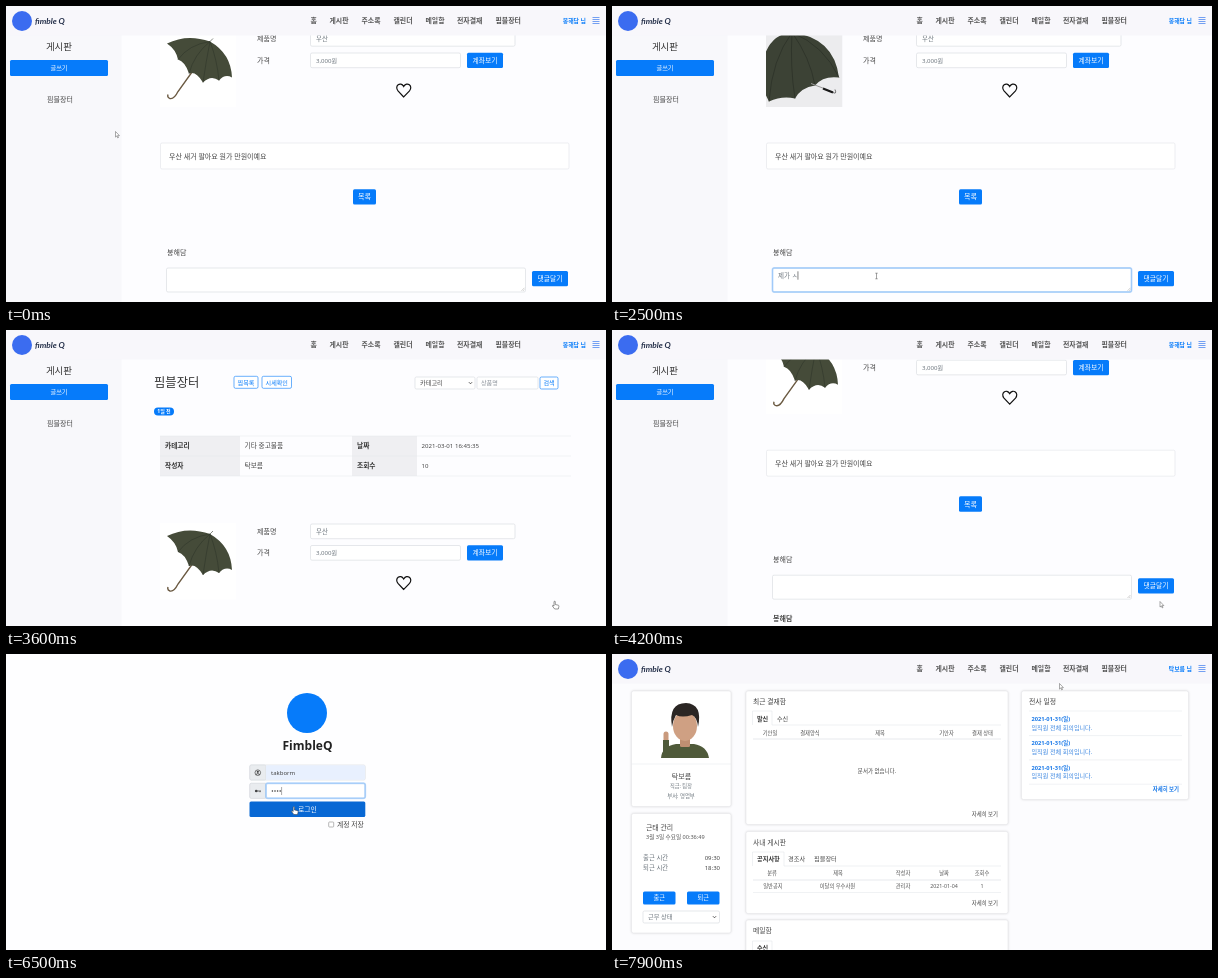
An HTML page that plays this animation: 600 px wide and 296 px high, repeating every 8000 ms.

```html
<!DOCTYPE html>
<html lang="ko">
<head>
<meta charset="utf-8">
<style>
  html, body { margin: 0; width: 100%; height: 100%; overflow: hidden; background: #fdfdff; }
  svg { display: block; width: 100vw; height: 100vh; }
  text { font-family: "Noto Sans", "Noto Sans CJK KR", "Noto Sans CJK", sans-serif; white-space: pre; }
  .brand { font-family: Lato, sans-serif; font-style: italic; font-weight: 700; }
  .card { filter: drop-shadow(0 .6px .8px #0002); }
</style>
</head>
<body>
<svg id="stage" viewBox="0 0 600 296"></svg>
<script>
const LOOP = 8000, BLUE = '#067bfa', INK = '#444', GRAY = '#6c757d', LINE = '#d5d9de';
const BUYER = '봉해담', SELLER = '탁보름', MARKET = '핌블장터', REPLY = '제가 살게요';
const RELOAD = 3300, LOGIN = 5000, HOME = 7500;
const PHOTO = 76.5, SCROLLED = 168.5, SCROLL_END = 264;

// Text is placed by its left edge (or anchor) and vertical centre.
const text = (x, y, s, size = 7, fill = INK, attrs = '') =>
  `<text x="${x}" y="${y + size * .37}" font-size="${size}" fill="${fill}" ${attrs}>${s}</text>`;
const mid = (x, y, s, size, fill, attrs = '') => text(x, y, s, size, fill, 'text-anchor="middle" ' + attrs);
const end = (x, y, s, size, fill, attrs = '') => text(x, y, s, size, fill, 'text-anchor="end" ' + attrs);
const bold = 'font-weight="700"', medium = 'font-weight="500"';
const rect = (x, y, w, h, fill = '#fff', stroke = 'none', r = 1.5, attrs = '') =>
  `<rect x="${x}" y="${y}" width="${w}" height="${h}" rx="${r}" fill="${fill}" stroke="${stroke}" stroke-width=".6" ${attrs}/>`;
const path = (d, stroke = INK, width = .6, fill = 'none', attrs = '') =>
  `<path d="${d}" stroke="${stroke}" stroke-width="${width}" fill="${fill}" ${attrs}/>`;
const circle = (x, y, r, fill, attrs = '') => `<circle cx="${x}" cy="${y}" r="${r}" fill="${fill}" ${attrs}/>`;
const rule = (x1, x2, y, color = '#e1e4e8') => path(`M${x1} ${y}H${x2}`, color, .5);
const group = (id, body, attrs = '') => `<g id="${id}" ${attrs}>${body}</g>`;
const button = (x, y, w, h, s, size = 6.8, id = '') =>
  rect(x, y, w, h, BLUE, 'none', 1.5, id && `id="${id}"`) + mid(x + w / 2, y + h / 2, s, size, '#fff');
const outlineButton = (x, y, w, h, s) => rect(x, y, w, h, '#fff', BLUE) + mid(x + w / 2, y + h / 2, s, 6.1, BLUE);
const chevron = (x, y) => path(`M${x - 1.6} ${y - .8}l1.6 1.6 1.6 -1.6`, '#333', .8);
const focusRing = (id, x, y, w, h) => group(id,
  rect(x, y, w, h, 'none', BLUE, 2, 'style="stroke-width:2;stroke-opacity:.22"') +
  rect(x, y, w, h, 'none', '#94c6ff'));

function header() {
  const nav = [[304.5, '홈'], [323.5, '게시판'], [355.5, '주소록'], [387.5, '캘린더'],
    [419.5, '메일함'], [451, '전자결재'], [489.5, MARKET]];
  return rect(0, 0, 600, 29.5, '#f8f7fb', 'none', 0) +
    circle(16, 15, 10, '#3b6cf0') +
    text(29, 15, 'fimble Q', 8.3, '#25304a', 'class="brand"') +
    nav.map(([x, s]) => text(x, 14.3, s, 6.9, '#555', bold)).join('') +
    end(580, 14.5, '', 5.9, BLUE, bold + ' id="user"') +
    path('M586.5 11.5h7m-7 2h7m-7 2h7m-7 2h7', '#3b7cf0', .7);
}

function sidebar() {
  return rect(0, 29, 115.5, 267, '#f8f8fb', 'none', 0) +
    mid(53, 40, '게시판', 9.5, '#333') +
    button(4, 54, 98, 16, '글쓰기', 6.2) +
    mid(54, 93, MARKET, 7, INK);
}

function openUmbrella(x) {
  return `<g transform="translate(${x})">` + rect(154, 193, PHOTO, PHOTO, '#fff', 'none', 0) +
    path('M195 222L172 254Q168 262 164 261Q161 260 162 257', '#6b5a42', 1.4) +
    path('M161 206Q181 196 204 204Q225 216 226 240Q219 236 213 243Q205 237 197 245Q190 233 183 236Q179 224 172 222Q170 212 161 206Z', 'none', 0, '#454b39') +
    path('M204 204Q183 207 172 222M204 204Q188 217 183 236M204 204Q200 224 197 245M204 204Q211 222 213 243M204 204l3 -3', '#30362a', .6) + '</g>';
}

function closeUmbrella(x) {
  return `<g transform="translate(${x})">` + rect(154, 193, PHOTO, PHOTO, '#ececee', 'none', 0) +
    path('M154 214Q162 196 180 195Q222 200 227 240Q211 238 203 248Q189 250 183 261Q170 258 157 264L154 258Z', 'none', 0, '#3c4235') +
    path('M180 195Q160 222 157 264M180 195Q178 230 183 261M180 195Q198 220 203 248M180 195Q212 208 227 240', '#282d24', .6) +
    path('M199 246L212 251', '#999', 1) + path('M211 251L221 255', '#181818', 2.4) +
    path('M221 255q4 2 2 -3', '#333', .7) + '</g>';
}

function post() {
  const cells = [[154, 80, '카테고리', '기타 중고물품', 116], [346, 65, '날짜', '2021-03-01 16:45:35', 116],
    [154, 80, '작성자', SELLER, 136], [346, 65, '조회수', '10', 136]];
  return text(148, 52.5, MARKET, 12.3, '#333') +
    outlineButton(228, 46.3, 24, 12, '찜목록') + outlineButton(256, 46.3, 29.5, 12, '시세확인') +
    rect(409, 47, 60, 12, '#fff', LINE) + text(414, 53, '카테고리', 6.2) + chevron(464.5, 53) +
    rect(471, 47, 61, 12, '#fff', LINE) + text(475, 53, '상품명', 6.1, '#8a9199') +
    outlineButton(534, 47, 18, 12, '검색') +
    rect(148, 77.5, 20, 8, BLUE, 'none', 4) + mid(158, 81.5, '1일 전', 5, '#fff', bold) +
    cells.map(([x, w, name, value, y]) => rect(x, y - 10, w, 20, '#efeff2', 'none', 0) +
      text(x + 5, y, name, 6.7, '#333', bold) +
      text(x + w + 4.5, y, value, value < 'a' ? 6.1 : 6.7)).join('') +
    [106, 126, 146].map(y => rule(154, 565, y)).join('') +
    `<g clip-path="url(#frame)">${group('slides', openUmbrella(0) + closeUmbrella(PHOTO) + openUmbrella(2 * PHOTO))}</g>` +
    text(251, 201.3, '제품명') + rect(304.5, 194, 204.5, 14.7, '#fff', LINE) + text(310, 201.3, '우산', 6.4, GRAY) +
    text(251, 222.5, '가격') + rect(304.5, 215.5, 150, 14.7, '#fff', LINE) + text(310, 222.8, '3,000원', 6.1, GRAY) +
    button(461, 215.3, 36, 15.3, '계좌보기') +
    path('M397.7 259.5L392 253.4C388 248.5 394.5 243.5 397.7 249C401 243.5 407.5 248.5 403.5 253.4Z', '#111', 1.2) +
    rect(154.5, 305.5, 408.5, 26, '#fff', '#e1e3e7') + text(163, 318.5, '우산 새거 팔아요 원가 만원이예요') +
    button(347, 351.7, 23, 15.3, '목록', 7) +
    text(161, 414.5, BUYER) +
    rect(160.5, 430.5, 359, 24, '#fff', LINE) + focusRing('replyFocus', 160.5, 430.5, 359, 24) +
    path('M515.5 453.3l3 -3m-1.2 3l1.2 -1.2', '#888', .4) +
    text(166, 438, '', 6.5, GRAY, 'id="reply"') + path('M0 433.8v8.4', '#333', .6, 'none', 'id="replyCaret"') +
    button(526, 433.5, 36, 15.3, '댓글달기') +
    group('posted', text(161, 474, BUYER, 7, INK, bold) + text(161, 486, REPLY, 6.5));
}

function login() {
  const field = y => rect(243.8, y, 115.4, 15, '#fff', LINE) + rect(243.8, y, 16, 15, '#e9ecef', LINE);
  return rect(0, 0, 600, 296, '#fefeff', 'none', 0) +
    circle(301, 59, 20, BLUE) + mid(301.5, 91.5, 'FimbleQ', 12, '#222', 'font-weight="600"') +
    field(111) + field(129.3) +
    group('filled', rect(260, 111.3, 99, 14.4, '#e8f0fe', 'none', 1) + text(265, 118.7, 'takborm', 6)) +
    text(265, 118.7, 'ID', 6, GRAY, 'id="idHint"') +
    text(265, 137, 'Password', 5.9, GRAY, 'id="passHint"') +
    focusRing('idFocus', 260, 111, 99.2, 15) + focusRing('passFocus', 260, 129.3, 99.2, 15) +
    circle(251.8, 118.7, 2.8, 'none', 'stroke="#444" stroke-width=".7"') + circle(251.8, 117.8, 1.1, INK) +
    path('M249.8 120.6q2 -2.2 4 0', INK, .9) +
    circle(250.2, 137, 1.3, INK) + path('M251 137h4m-1 0v1.2', INK, .8) +
    [0, 1, 2, 3].map(i => circle(266.4 + 2.6 * i, 137, .8, '#333', `id="dot${i}"`)).join('') +
    path('M0 133v8', '#555', .5, 'none', 'id="loginCaret"') +
    button(243.5, 147.6, 115.8, 15.4, '로그인', 6.9, 'signIn') +
    rect(322.7, 168, 5, 5, '#fff', '#888', .8) + text(331, 170.5, '계정 저장', 6.8);
}

function home() {
  const card = (x, y, w, h) => rect(x, y, w, h, '#fff', '#e6e6ea', 2, 'class="card"');
  const tab = (y, w) => path(`M140.5 ${y + 14}V${y}h${w}v14H389`, '#dee2e6', .5);
  const row = (y, items) => items.map(([x, s]) => mid(x, y, s, 5.3, '#555')).join('');
  const hours = (y, name, value) => text(31, y, name, 6.4, GRAY) + end(108, y, value, 6, INK);
  const avatar = path('M49 104Q50 92 64 90H82Q95 92 97 104Z', 'none', 0, '#4f5a3a') +
    path('M54 92V80', '#c99a7d', 5, 'none', 'stroke-linecap="round"') + path('M54 98V86', '#4f5a3a', 6) +
    rect(68, 82, 10, 11, '#c08f72') + `<ellipse cx="73" cy="72" rx="12" ry="15" fill="#cfa083"/>` +
    path('M60 73Q56 49 74 49Q91 50 86 73Q85 63 80 61Q70 64 64 61Q61 66 60 73Z', 'none', 0, '#2b2624');
  return rect(0, 29, 600, 267, '#fcfcfe', 'none', 0) +
    card(19.5, 37, 99.5, 115.5) + rule(19.5, 119, 110) + avatar +
    mid(69.5, 122.5, SELLER, 7, INK, medium) +
    mid(69, 132.5, '직급: 팀장', 5.2, GRAY) + mid(69, 142, '부서: 영업부', 5.4, GRAY) +
    card(19.5, 159.5, 99.5, 119.5) + text(34, 173.5, '근태 관리', 6.9, INK, medium) +
    text(34, 182.7, '', 5.6, '#555', 'id="clock"') +
    hours(204, '출근 시간', '09:30') + hours(213.5, '퇴근 시간', '18:30') +
    button(31, 237.5, 32.5, 13, '출근', 6.3) + button(75, 237.5, 32.5, 13, '퇴근', 6.3) +
    rect(31, 257, 76.5, 12, '#fff', LINE) + text(36, 263, '근무 상태', 6.2, GRAY) + chevron(102.5, 263) +

    card(134, 37, 262, 133.5) + text(141, 47, '최근 결재함', 6.8, INK, medium) + tab(57, 19.5) +
    text(145, 64.5, '발신', 6.1, '#333', bold) + text(165, 64.5, '수신', 6.1) +
    row(78.7, [[158, '기안일'], [198, '결재양식'], [268, '제목'], [334.5, '기안자'], [370.5, '결재 상태']]) +
    rule(141, 389, 85, '#cfd3d8') + mid(265, 117, '문서가 없습니다.', 5.5, INK) + end(386, 160, '자세히 보기', 5.4, INK) +

    card(134, 177.5, 262, 82) + text(141, 188, '사내 게시판', 6.8, INK, medium) + tab(198, 31.5) +
    text(145, 205, '공지사항', 6.2, '#333', bold) + text(176, 205, '경조사', 6.2) + text(202, 205, MARKET, 6.2) +
    row(219.5, [[160, '분류'], [226, '제목'], [291, '작성자'], [332, '날짜'], [370, '조회수']]) +
    rule(141, 389, 226, '#cfd3d8') +
    row(232, [[161, '일반공지'], [225.5, '이달의 우수사원'], [291, '관리자'], [332, '2021-01-04'], [370, '1']]) +
    rule(141, 389, 238.5) + end(386, 249, '자세히 보기', 5.4, INK) +

    card(134, 266, 262, 60) + text(141, 276.5, '메일함', 6.8, INK, medium) + tab(287, 19.5) +
    text(145, 294, '수신', 6.1, '#333', bold) +

    card(409.5, 37, 167, 108.5) + text(417, 47, '전사 일정', 6.9, INK, medium) + rule(417, 570, 57) +
    [65, 89.3, 113.6].map(y => text(419.5, y, '2021-01-31(일)', 5.7, '#1677e8', bold) +
      text(419.5, y + 8.3, '임직원 전체 회의입니다.', 6.1, '#3b86e0') + rule(417, 570, y + 16.6)).join('') +
    end(567, 135, '자세히 보기', 5.4, '#1677e8', bold);
}

const pointers = {
  arrow: path('M0 0v5.6l1.3 -1.2 .9 2 .8 -.4 -.9 -1.9h1.8Z', '#555', .5, '#fff'),
  beam: path('M-1.2 -2.8h2.4M0 -2.8v5.6M-1.2 2.8h2.4', '#555', .55),
  hand: path('M0 0q1 -1 1.3 .3v2.7l3 .7q.8 .3 .6 1.3l-.6 2.5h-3.6l-2.4 -3q0 -1.3 1.7 0Z', '#333', .5, '#fff'),
};

const stage = document.getElementById('stage');
stage.innerHTML = `<clipPath id="frame">${rect(154, 193, PHOTO, PHOTO, '#fff', 'none', 0)}</clipPath>` +
  rect(0, 0, 600, 296, '#fdfdff', 'none', 0) +
  group('board', group('post', post()) + sidebar()) + group('home', home()) +
  group('header', header()) + group('login', login()) +
  group('pointer', Object.entries(pointers).map(([id, shape]) => group(id, shape)).join(''));

const $ = id => document.getElementById(id);
// "inherit" keeps a part hidden while its page is hidden.
const show = (id, on) => $(id).setAttribute('visibility', on ? 'inherit' : 'hidden');
const move = (id, x, y) => $(id).setAttribute('transform', `translate(${x} ${y})`);
const progress = (t, from, to) => Math.min(1, Math.max(0, (t - from) / (to - from)));
const ease = (t, from, to) => { const p = progress(t, from, to); return p * p * (3 - 2 * p); };
const within = (t, from, to) => t >= from && t < to;
const blink = (t, from) => (t - from) % 1000 < 500;

// Each step holds from its time on: [ms, value].
const typing = [[0, ''], [1800, 'ㅈ'], [2100, '제'], [2200, '제ㄱ'], [2300, '제가'], [2400, '제가 '], [2500, '제가 ㅅ'],
  [2600, '제가 사'], [2700, '제가 살'], [2800, '제가 살게'], [2900, REPLY], [RELOAD, '']];
// Pointer stops: [ms, x, y, shape].
const route = [[0, 109.5, 125.5, 'arrow'], [150, 109.5, 125.5, 'arrow'], [900, 264.5, 270, 'beam'], [2700, 264.5, 270, 'arrow'],
  [2950, 548, 271.5, 'hand'], [3900, 548, 271.5, 'arrow'], [4999, 548, 271.5, 'arrow'], [LOGIN, 199.7, 38, 'arrow'],
  [5250, 199.7, 38, 'arrow'], [5650, 290, 118, 'beam'], [5900, 290, 118, 'beam'], [6050, 290, 136, 'beam'],
  [6350, 290, 136, 'beam'], [6480, 287.2, 153, 'hand'], [HOME, 287.2, 153, 'arrow'], [7850, 447.5, 29.5, 'arrow']];
const lastStep = (steps, t) => steps.findLastIndex(step => step[0] <= t);

function drawPointer(t) {
  const i = lastStep(route, t), from = route[i], to = route[i + 1] || from;
  const p = to === from ? 0 : ease(t, from[0], to[0]);
  move('pointer', from[1] + (to[1] - from[1]) * p, from[2] + (to[2] - from[2]) * p);
  for (const shape in pointers) show(shape, shape === from[3]);
}

function drawBoard(t) {
  const reloaded = t >= RELOAD;
  move('post', 0, reloaded ? -SCROLL_END * ease(t, 3850, 4400) : -SCROLLED);
  move('slides', reloaded ? 0 : -PHOTO * (ease(t, 400, 650) + ease(t, 2600, 2850)), 0);
  $('reply').textContent = typing[lastStep(typing, t)][1];
  $('replyFocus').setAttribute('opacity', reloaded ? 0 : progress(t, 1200, 1450));
  show('replyCaret', within(t, 1200, 1700) || within(t, 1800, 2950));
  move('replyCaret', 166.3 + $('reply').getComputedTextLength(), 0);
  show('posted', reloaded);
}

function drawLogin(t) {
  const onPassword = t >= 6050, dots = Math.floor(progress(t, 6050, 6450) * 4);
  show('filled', t >= 5850);
  show('idHint', t < 5850);
  show('passHint', dots === 0);
  $('idFocus').setAttribute('opacity', onPassword ? 0 : progress(t, 5700, 5800));
  $('passFocus').setAttribute('opacity', progress(t, 6050, 6150));
  for (let i = 0; i < 4; i++) show('dot' + i, i < dots);
  show('loginCaret', onPassword && (t < 6450 || blink(t, 6450)));
  move('loginCaret', 265.2 + 2.6 * dots, 0);
  $('signIn').setAttribute('fill', t >= 6450 ? '#0868d4' : BLUE);
}

function draw(t) {
  show('board', t < LOGIN);
  show('login', within(t, LOGIN, HOME));
  show('home', t >= HOME);
  show('header', !within(t, LOGIN, HOME));
  $('user').textContent = (t < LOGIN ? BUYER : SELLER) + ' 님';
  $('clock').textContent = `3월 3일 수요일 00:36:${t < 7900 ? 48 : 49}`;
  if (t < LOGIN) drawBoard(t);
  else if (t < HOME) drawLogin(t);
  drawPointer(t);
}

const start = performance.now();
function tick() {
  draw((performance.now() - start) % LOOP);
  requestAnimationFrame(tick);
}
tick();
</script>
</body>
</html>
```
